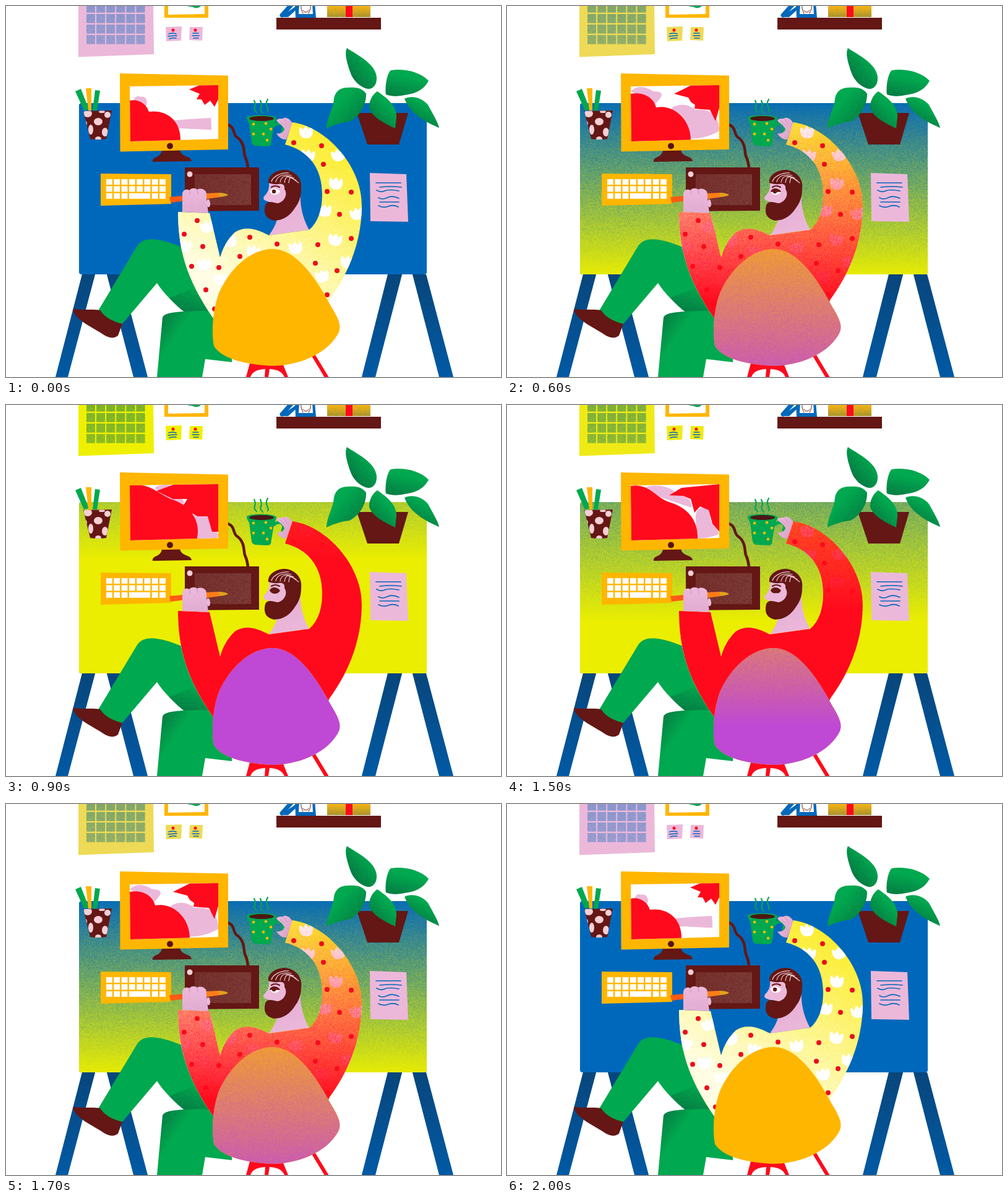
An HTML page with a canvas for the animation above (4.8 s loop, 800 by 600 pixels).

```html
<!DOCTYPE html>
<html lang="en">
<head>
<meta charset="utf-8">
<title>At the desk</title>
<style>
html, body { margin: 0; width: 100%; height: 100%; overflow: hidden; background: #fff; }
canvas { display: block; width: 800px; height: 600px; }
</style>
</head>
<body>
<canvas id="stage" width="800" height="600"></canvas>
<script>
const W = 800, H = 600, LOOP = 4800, STEPS = 6;
const BROWN = '#641715', PINK = '#ecb8da', GREEN = '#00a84f', GOLD = '#ffb600',
  BLUE = '#0068bb', RED = '#ff0a1c', LIME = '#ebee00', PURPLE = '#bf48d5', SHADE = '#0b5238';

const surface = () => Object.assign(document.createElement('canvas'), { width: W, height: H });
const scratch = surface().getContext('2d', { willReadFrequently: true });
let g;

// Seeded noise, shared by every grainy fill
let seed = 7;
const noise = Float32Array.from({ length: W * H }, () => {
  seed = (Math.imul(seed, 1664525) + 1013904223) >>> 0;
  return seed / 4294967296;
});

const rgb = hex => [1, 3, 5].map(i => parseInt(hex.slice(i, i + 2), 16));
const mix = (a, b, f) => {
  const q = rgb(b);
  return '#' + rgb(a).map((v, i) => Math.round(v + (q[i] - v) * f).toString(16).padStart(2, '0')).join('');
};
const nums = d => d.match(/-?[\d.]+/g).map(Number);

function fill(color, ...paths) {
  g.fillStyle = color;
  paths.forEach(d => g.fill(new Path2D(d)));
}
function line(color, width, ...paths) {
  g.strokeStyle = color;
  g.lineWidth = width;
  g.lineCap = g.lineJoin = 'round';
  paths.forEach(d => g.stroke(new Path2D(d)));
}
function oval(color, x, y, rx, ry = rx, turn = 0) {
  g.fillStyle = color;
  g.beginPath();
  g.ellipse(x, y, rx, ry, turn, 0, 7);
  g.fill();
}
const dots = (color, r, list) => list.forEach(([x, y]) => oval(color, x, y, r));
const box = (x, y, w, h) => `M${x} ${y}L${x + w} ${y}L${x + w} ${y + h}L${x} ${y + h}Z`;
function clipped(d, paint) {
  g.save();
  g.clip(new Path2D(d));
  paint();
  g.restore();
}

// Speckled gradient of one colour, alpha a0 to a1 along the given axis
function grain(d, color, [x0, y0, x1, y1], a0 = 0, a1 = 1) {
  const c = rgb(color), n = nums(d);
  const xs = n.filter((_, i) => i % 2 === 0), ys = n.filter((_, i) => i % 2);
  const l = Math.max(0, Math.floor(Math.min(...xs))), t = Math.max(0, Math.floor(Math.min(...ys)));
  const w = Math.min(W, Math.ceil(Math.max(...xs))) - l, h = Math.min(H, Math.ceil(Math.max(...ys))) - t;
  const ramp = scratch.createLinearGradient(x0, y0, x1, y1);
  [a0, a1].forEach((a, i) => ramp.addColorStop(i, `rgba(${c},${a})`));
  scratch.clearRect(0, 0, W, H);
  scratch.fillStyle = ramp;
  scratch.fill(new Path2D(d));
  const img = scratch.getImageData(l, t, w, h), px = img.data;
  for (let y = 0, i = 0; y < h; y++) for (let x = 0; x < w; x++, i += 4) {
    const a = px[i + 3] / 255;
    [px[i], px[i + 1], px[i + 2]] = c;
    px[i + 3] = 255 * (a + (noise[(t + y) * W + l + x] - 0.5) * 1.1 * a * (1 - a));
  }
  scratch.putImageData(img, l, t);
  g.drawImage(scratch.canvas, l, t, w, h, l, t, w, h);
}

// Blend between key poses set at these steps
const KEYS = [0, 1, 3, 5, 6];
function morph(poses, step) {
  const i = Math.max(0, KEYS.findIndex(k => k >= step) - 1);
  const f = (step - KEYS[i]) / (KEYS[i + 1] - KEYS[i]), next = nums(poses[i + 1]);
  let k = 0;
  return poses[i].replace(/[\d.]+/g, v => +v + (next[k++] - v) * f);
}

// Start and end height of the colour wave at each step
const WAVE = {
  desk: [null, [235, 640], [190, 520], [145, 440], [50, 400], [-40, 350], [-120, 250]],
  shirt: [null, [250, 850], [210, 650], [170, 480], [0, 400], [-200, 330], [-600, 250]],
  chair: [null, [400, 1000], [360, 800], [300, 650], [260, 590], [220, 520], [100, 350]]
};
function wave(part, d, color, step) {
  const y = WAVE[part][step];
  if (y) grain(d, color, [0, y[0], 0, y[1]]);
}

const HILL = [
  'M200 153C212 150 226 156 231 171C260 167 283 186 282 218L200 219Z',
  'M200 149C216 147 230 156 233 172C262 167 288 185 288 218L200 219Z',
  'M200 142C222 138 238 150 241 164C270 158 298 185 297 218L200 219Z',
  'M200 131C230 126 240 150 262 157C284 163 310 180 308 218L200 219Z',
  'M200 129C235 125 250 148 272 154C300 165 316 190 308 218L200 219Z'];
const STAR = [
  'M296 135L313 128L343 128L343 151L337 163L330 153L321 160L316 151L308 151L313 142Z',
  'M294 139L305 128L343 128L343 154L336 165L327 156L316 163L315 154L306 155L311 145Z',
  'M270 142L298 128L343 128L343 165L337 186L328 168L303 166L304 160L297 155L293 148Z',
  'M262 146L282 134L343 128L343 205L332 192L326 170L312 164L303 174L297 152L285 147Z',
  'M243 139L273 128L343 128L343 205L333 205L326 180L310 180L284 167L293 152L270 152Z'];
const CLOUD = [
  'M207 155C206 145 215 145 217 147C228 144 230 158 226 162Z',
  'M201 150C206 140 222 140 231 144C238 150 234 160 230 166Z',
  'M200 138C212 126 228 132 236 138C262 138 245 152 238 160Z',
  'M215 138C225 128 255 128 268 138C282 148 300 148 298 166Z',
  'M240 134C250 127 265 128 273 134C275 150 296 150 284 170Z'];
const FIELD = [
  'M272 185C290 183 310 182 331 181C332 187 332 194 332 200C315 200 295 198 278 198Z',
  'M272 183C285 173 310 178 330 179C344 186 344 194 330 199C315 204 295 206 282 205Z',
  'M266 165C280 156 295 160 305 168C330 164 344 180 343 202C330 210 312 216 290 214Z',
  'M305 180C305 162 328 162 328 176C326 190 340 200 343 208C335 214 320 214 306 218Z',
  'M304 178C310 170 328 172 330 182C332 190 343 203 343 212C343 216 330 217 306 218Z'];

function wall(step) {
  const f = [0, 0.05, 0.35, 0.6, 0.78, 0.9, 1][step];
  const paper = mix(PINK, '#eff000', f);
  fill(paper, 'M117 -5L238 -5L239 78L117 82.5Z');
  let cells = '';
  for (let r = 0; r < 4; r++) for (let c = 0; c < 6; c++)
    cells += box(130 + c * 16.1, -4 + r * 17, 14, 14.5);
  fill(mix('#6c8cc9', '#58a035', f), cells);
  grain(cells, paper, [0, -20, 0, 70], 0.2, 0.38);

  fill(paper, 'M258 34L284 33L283 56L259 57Z', 'M297 34L318 34L317 56L296 55Z');
  dots(RED, 2.5, [[270, 39], [306, 39]]);
  line(BLUE, 1.5, 'M263 45Q269 43 275 45', 'M262 49Q269 48 276 48', 'M264 53Q270 51 275 52',
    'M302 44L311 44', 'M301 48L312 48', 'M303 52L311 52');

  fill(GOLD, 'M256 -5L327 -5L327 19L256 19Z');
  fill('#fff', 'M262 -5L321 -5L321 13L262 14Z');
  fill(GREEN, 'M291 -2C296 3 300 0 305 3C311 4 315 1 316 -2Z');

  line(BLUE, 7, 'M446 15L463 -4');
  fill(BLUE, 'M443 18L457 18L469 8L469 0Z');
  fill('#fff', 'M456 18L469 18L468 7Z');
  fill(BLUE, 'M467 -5L499 -5L501 19L468 19Z');
  fill('#fff', 'M474 -5L495 -5L496 13L473 13Z');
  line(BROWN, 1, 'M477 0C476 5 479 9 480 12', 'M492 0C493 5 490 9 489 12', 'M480 7C482 11 487 11 489 7');
  const gift = 'M519 -5L589 -5L589 18L519 18Z';
  fill('#f7b414', gift);
  grain(gift, '#77803f', [0, 0, 0, 22], 0, 0.75);
  fill(RED, 'M549 -5L560 -5L560 18L549 18Z');
  fill(BROWN, 'M437 19L606 19L606 38L437 38Z');
}

function desk(step) {
  ['M123 434L144 434L100 600L80 600Z', 'M163 434L185 434L229 600L206 600Z',
    'M617 434L640 434L597 600L575 600Z', 'M657 434L679 434L723 600L700 600Z'].forEach(d => {
    fill('#005dab', d);
    grain(d, '#0c3a62', [0, 434, 0, 610], 0.65, 0.05);
  });
  const top = 'M122 157L676 157Q680 157 680 161L680 430Q680 434 676 434L122 434Q118 434 118 430L118 161Q118 157 122 157Z';
  fill(BLUE, top);
  wave('desk', top, LIME, step);
}

function monitor(step) {
  line(BROWN, 4.5, 'M359 192C371 197 366 207 373 212C388 222 383 240 387 245Q390 252 391 262');
  fill(BROWN, 'M252 232L281 232C283 246 299 241 300 251L237 252C236 242 251 247 252 232Z');
  fill(GOLD, 'M184 109L359 112.5L359 232L184.5 235.5Z');
  oval('#57120f', 265, 226.5, 5);
  const screen = 'M200 130L343 128L343 215L201 219Z';
  fill('#fff', screen);
  clipped(screen, () => {
    fill(PINK, morph(CLOUD, step), morph(FIELD, step));
    fill(RED, morph(HILL, step), morph(STAR, step));
  });
}

function pot() {
  fill(GREEN, 'M112 138L121 134L134 167L126 169Z', 'M144 136L152 137L147 169L140 169Z');
  fill(GOLD, 'M129 133L138 133L138 169L133 169Z');
  const cup = 'M125 170L171 169L162 215Q149 217 136 215Z';
  fill(BROWN, cup);
  clipped(cup, () => [[132, 174, 7, 6], [149, 187, 7, 6], [164, 176, 5, 5], [137, 200, 4, 8],
    [155, 171, 5, 2], [160, 204, 5, 7], [149, 215, 5, 4], [128, 190, 3, 4]].forEach(s => oval('#f6cfd6', ...s)));
}

function plant() {
  fill(BROWN, 'M567 173L650 173L635 224L584 224Z');
  [['M551 68C565 78 597 92 599 115C600 128 592 135 585 134C574 132 561 122 556 106C553 96 546 78 551 68Z', [590, 92, 556, 122]],
    ['M614 143C612 130 616 108 622 104C640 101 668 105 683 121C676 134 665 140 650 143C635 146 625 147 614 143Z', [645, 115, 636, 155]],
    ['M518 198C518 182 529 166 530 150C532 138 540 132 552 132C564 131 576 132 582 142C582 165 568 180 555 187C542 188 525 194 518 198Z', [538, 158, 580, 195]],
    ['M600 138C612 146 632 160 631 180L629 198C612 190 592 180 587 165C586 155 592 143 600 138Z', [618, 162, 590, 190]],
    ['M644 150C655 144 672 148 682 160C690 175 698 188 700 197C685 190 655 178 644 150Z', [678, 160, 660, 194]]
  ].forEach(([d, axis]) => {
    fill(GREEN, d);
    grain(d, SHADE, axis, 0, 0.6);
  });
}

function deskItems() {
  fill(GOLD, 'M153 271L267 272L267 320L153 323Z');
  for (let r = 0; r < 3; r++) for (let c = 0; c < 8; c++) {
    const space = r === 2 && c === 3;
    if (r === 2 && c > 3 && c < 6) continue;
    fill('#fff', box(162 + c * 12.3, 280 + r * 11.4, space ? 34 : 9.8, 9));
  }
  fill(BROWN, 'M289 261L409 261L409 331L289 332Z');
  const pad = 'M305 272L396 272L396 322L305 322Z';
  grain(pad, '#a0746c', [300, 0, 400, 0], 0.25, 0.36);
  oval('#f6cfd6', 297, 272, 4.5);

  fill(PINK, 'M588 270L647 272L650 349L589 348Z');
  line(BLUE, 1.7, 'M598 286L638 286', 'M604 293Q622 291 639 293', 'M599 298Q606 302 612 299T635 299',
    'M602 310Q608 314 616 310T635 311', 'M604 317L635 317', 'M602 323Q610 327 618 324T634 325');

  line(GREEN, 2.2, 'M401 153Q404 158 402 163T405 172', 'M411 153Q414 159 412 164T415 173', 'M423 151Q419 157 422 163T423 171');
  line(GREEN, 5, 'M432 194C440 187 453 189 447 203');
  fill(GREEN, 'M389 181C389 175 437 175 437 182C436 188 434 189 433 193L428 224Q427 227 421 227L403 226Q398 225 397 221L393 190Q390 187 389 181Z');
  oval('#4d1714', 413, 182, 20, 4);
  dots('#ffbf00', 2.3, [[400, 191], [420, 190], [400, 207], [416, 207], [422, 217], [428, 199]]);
}

const SHIRT = 'M463 188C520 196 577 262 575 325C574 390 548 440 523 474L500 520L335 520L335 505C290 440 278 390 278 333L329 335L346 407C350 392 358 377 370 366C388 354 408 362 425 371L490 362C504 350 511 330 511 305C511 263 490 234 451 224Z';
const CHAIR = 'M431 393C468 393 500 438 525 485C539 508 544 520 535 533C515 565 470 582 430 582C390 580 350 572 336 550C331 520 336 484 345 462C362 425 395 393 431 393Z';
const TULIP = [[485, 204], [488, 242], [537, 241], [533, 287], [515, 331], [567, 336], [532, 378], [468, 391], [511, 437],
  [400, 397], [362, 380], [320, 418], [288, 388], [325, 357], [552, 414], [347, 442]];
const SPOT = [[465, 221], [510, 226], [513, 256], [519, 300], [558, 301], [539, 337], [558, 376], [504, 386], [500, 416], [535, 428],
  [438, 385], [394, 374], [378, 405], [344, 423], [318, 389], [309, 347], [288, 369], [300, 421], [323, 459], [337, 490], [519, 467]];

function legs() {
  fill(GREEN, 'M150 491L212 388C223 371 250 376 284 390L345 420L345 512L290 496C275 485 255 465 244 448L188 514Q165 518 150 491Z');
  grain('M264 472L345 440L345 512L290 496C281 490 272 481 264 472Z', SHADE, [312, 455, 295, 508], 0, 0.6);
  const shin = 'M253 504C256 494 285 494 320 493L365 500L365 576L322 571L317 600L244 600Z';
  fill(GREEN, shin);
  grain(shin, SHADE, [254, 500, 284, 520], 0.5, 0);
  fill(BROWN, 'M108 490C130 492 145 490 152 492C160 505 178 512 188 514L181 533C175 538 168 537 160 533C145 522 110 508 108 490Z');
}

function head(step) {
  const neck = 'M425 371C438 352 440 345 440 320L476 296C474 325 481 346 490 362Z';
  fill(PINK, neck);
  grain(neck, '#c98fc0', [440, 320, 465, 372], 0.2, 0);
  fill(PINK, 'M425 284C426 295 424 301 417 308Q414 313 420 315L426 317L425 335L458 335L465 280Z');
  fill(BROWN, 'M424 286C422 271 444 262 457 266C473 271 479 284 477 297C477 307 474 317 468 325C460 338 449 347 433 347C419 344 416 334 419 322C423 313 434 319 440 319C450 316 456 305 450 296C451 289 447 287 440 288C434 289 428 287 424 286Z');
  for (let i = 0; i < 5; i++)
    line('#f0cdd0', 1.2, `M${429 + i * 7} ${284 + i * 0.5}C${431 + i * 7} ${276 - i} ${444 + i * 4} ${269 + i * 2} ${457 + i * 4} ${270 + i * 4}`);
  line(BROWN, 2.2, 'M429 293Q435 289 442 293');
  const eye = 'M426 300C428 294 438 293 443 300C440 307 429 307 426 300Z';
  fill('#fff', eye);
  clipped(eye, () => {
    oval(BROWN, 433, 300, 3.2);
    fill(BROWN, box(424, 290, 22, 5 + step * 1.9));
  });
}

function worker(step) {
  legs();
  const fist = 'M437 185C441 180 446 184 449 181C455 180 460 184 463 190L453 216C445 216 440 211 437 206C442 207 449 205 450 199C446 191 440 190 437 185Z';
  fill(PINK, fist);
  grain(fist, '#b97fb4', [440, 185, 462, 200], 0, 0.3);
  line('#c890be', 1, 'M443 186L450 193', 'M449 183L454 191');

  head(step);
  line(RED, 6, 'M495 562L518 600');
  fill('#fcec22', SHIRT);
  grain(SHIRT, '#ffffff', [540, 220, 380, 470], 0.05, 0.88);
  clipped(SHIRT, () => {
    TULIP.forEach(([x, y], i) => {
      g.save();
      g.translate(x, y);
      g.rotate(0.25 * Math.sin(i * 2.3));
      fill('#fff', 'M-11 -7Q-8 -9 -5 -4L-1 -10Q1 -10 4 -4Q7 -10 10 -8C13 4 9 10 0 10C-9 10 -12 3 -11 -7Z');
      g.restore();
    });
    dots('#ec0d1d', 4, SPOT);
  });
  wave('shirt', SHIRT, RED, step);

  fill('#ff5a16', 'M264 309L330 303L331 310L266 318Z');
  fill('#ff7d18', 'M323 303L344 302L346 309L324 312Z');
  fill('#e0a11c', 'M343 302Q356 302 359 306Q354 308 345 309Z');
  const hand = 'M285 333L285 305C285 297 292 295 296 298C301 293 307 295 309 297C314 294 320 296 323 300C325 306 323 312 325 319L327 335Z';
  fill(PINK, hand);
  grain(hand, '#b97fb4', [305, 334, 305, 300], 0.2, 0);
  oval(PINK, 327, 319, 3, 6.5, -0.1);
  line('#c890be', 1, 'M297 299L297 305', 'M309 298L310 304');

  fill(RED, 'M394 578L447 578L456 600L450 600Q445 588 426 587L424 600L418 600L419 587Q399 588 395 600L388 600Z');
  fill(GOLD, CHAIR);
  wave('chair', CHAIR, PURPLE, step);
}

function bake(step) {
  const c = surface();
  g = c.getContext('2d');
  fill('#ffffff', box(0, 0, W, H));
  wall(step);
  desk(step);
  monitor(step);
  pot();
  plant();
  deskItems();
  worker(step);
  return c;
}

const scenes = Array.from({ length: STEPS + 1 }, (_, i) => bake(i));
const view = document.getElementById('stage').getContext('2d');

function stepAt(t) {
  if (t < 400) return 0;
  if (t < 900) return 1 + Math.floor((t - 400) / 100);
  if (t < 1500) return STEPS;
  if (t < 2000) return STEPS - 1 - Math.floor((t - 1500) / 100);
  return 0;
}
function play(now) {
  view.drawImage(scenes[stepAt(now % LOOP)], 0, 0);
  requestAnimationFrame(play);
}
play(performance.now());
</script>
</body>
</html>
```
